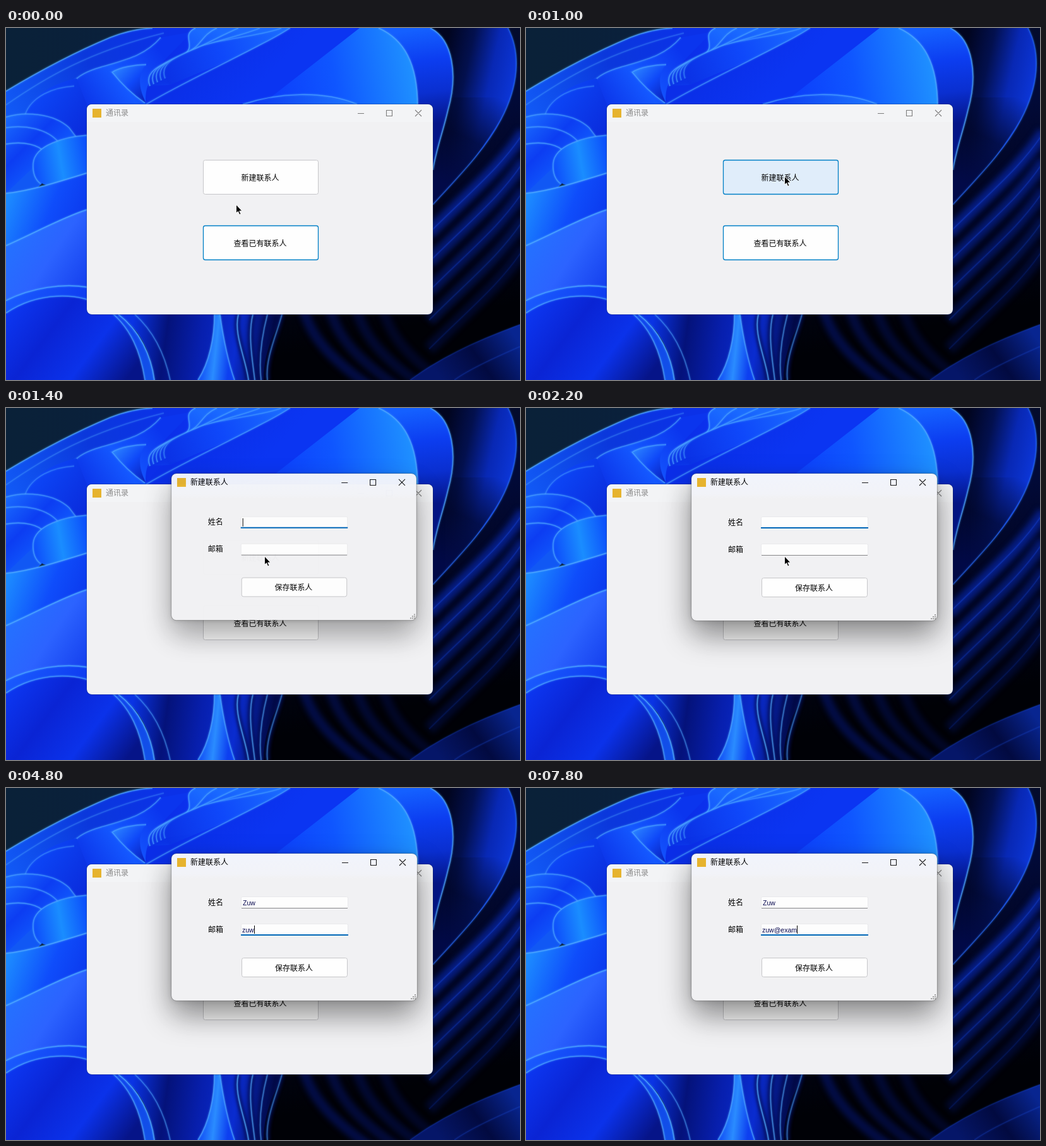
Write an HTML page with a canvas that moves like this. It is 814x558 px and loops after 8000 ms.

```html
<!DOCTYPE html>
<html lang="zh-CN">
<head>
<meta charset="utf-8">
<title>通讯录</title>
<style>
html, body { margin: 0; width: 100%; height: 100%; overflow: hidden; background: #0826c8; }
canvas, svg { position: absolute; left: 0; top: 0; width: 814px; height: 558px; }
text { font: 12px "Noto Sans CJK SC", "Noto Sans CJK", sans-serif; fill: #000; white-space: pre; }
.typed { font: 10.5px "Liberation Sans", Arial, sans-serif; fill: #0a0a50; }
.mid { text-anchor: middle; }
.btn { fill: #fefefe; stroke: #c6c6c9; }
.glyph { fill: none; stroke: #1a1a1a; stroke-width: 1.1; }
.dim { stroke: #7d7d7d; }
</style>
</head>
<body>
<canvas id="wall" width="814" height="558"></canvas>
<svg viewBox="0 0 814 558">
  <defs>
    <linearGradient id="bar" x1="0" y1="0" x2="0" y2="1">
      <stop offset="0" stop-color="#f1f4fc"/><stop offset=".14" stop-color="#f2f3f8"/>
      <stop offset=".17" stop-color="#f1f1f3"/>
    </linearGradient>
    <clipPath id="mainBox"><rect x="128" y="121" width="548" height="333" rx="8"/></clipPath>
  </defs>

  <g clip-path="url(#mainBox)">
    <rect x="128" y="121" width="548" height="333" fill="#f1f1f3"/>
    <rect x="128" y="121" width="548" height="28" fill="#f3f4f6"/>
  </g>
  <rect x="127.5" y="120.5" width="549" height="334" rx="8" fill="none" stroke="#1c2c60" stroke-opacity=".35"/>
  <rect x="137" y="128" width="14" height="14" fill="#e6b32e"/>
  <text x="158" y="139.3" style="fill:#8a8a8a">通讯录</text>
  <path class="glyph dim" d="M557,135.5H567M602.5,130.5H611.5V139.5H602.5ZM648,130L658,140M658,130L648,140"/>
  <rect class="btn" id="add" x="312.5" y="209.5" width="182" height="54" rx="3"/>
  <text class="mid" x="402.5" y="241.5">新建联系人</text>
  <rect class="btn" id="view" x="312.5" y="313.5" width="182" height="54" rx="3"/>
  <text class="mid" x="402.5" y="345.5">查看已有联系人</text>

  <g id="dialog">
    <rect id="panel" x="262" y="104" width="389" height="233" rx="8" fill="url(#bar)"/>
    <rect x="261.7" y="103.7" width="389.6" height="233.6" rx="8" fill="none" stroke="#555" stroke-opacity=".45" stroke-width=".8"/>
    <rect x="271" y="111" width="14" height="14" fill="#e6b32e"/>
    <text x="292" y="122.3">新建联系人</text>
    <path class="glyph" d="M532,118.5H542M577.5,113.5H586.5V122.5H577.5ZM623,113L633,123M633,113L623,123"/>
    <text x="320" y="185.5">姓名</text>
    <text x="320" y="228.5">邮箱</text>
    <g id="fields"></g>
    <rect class="btn" x="373.5" y="269.5" width="167" height="30" rx="3"/>
    <text class="mid" x="456" y="289.5">保存联系人</text>
    <path d="M647,328h2M644,331h2m1,0h2M641,334h2m1,0h2m1,0h2" stroke="#a0a0a0" stroke-width="2"/>
  </g>
  <path id="mouse" d="M0,0V13.5L3,10.7L5.2,15.8L7.4,14.8L5.2,10H9.4Z" stroke="#fff" stroke-width=".9"/>
</svg>
<script>
const $ = id => document.getElementById(id);

// ---- wallpaper ----
const ctx = $('wall').getContext('2d');

function leaf(d, [x0, y0, x1, y1], ...colors) {
  const g = ctx.createLinearGradient(x0, y0, x1, y1);
  colors.forEach((c, i) => g.addColorStop(i / (colors.length - 1), c));
  ctx.fillStyle = g;
  ctx.fill(new Path2D(d));
}

function rim(d, alpha = 0.8, color = '#4fa8ff') {
  const p = new Path2D(d);
  ctx.strokeStyle = color;
  for (const [w, a] of [[6, 0.12], [3.5, 0.25], [1.5, 1]]) {
    ctx.lineWidth = w;
    ctx.globalAlpha = alpha * a;
    ctx.stroke(p);
  }
  ctx.globalAlpha = 1;
}

// a wide, soft fold of cloth in the dark part
function fold(d, width, color) {
  ctx.save();
  ctx.filter = `blur(${width / 4}px)`;
  ctx.strokeStyle = color;
  ctx.lineWidth = width;
  ctx.stroke(new Path2D(d));
  ctx.restore();
}

function paintWall() {
  leaf('M0,0H814V558H0Z', [0, 0, 814, 0], '#0a2138', '#0a1f40', '#030b2c');

  // right side: dark folds under two bright bands
  leaf('M600,100L814,60V558H400V440Z', [720, 130, 790, 440], '#020a38', '#01041c', '#000106');
  leaf('M600,0H795C816,40 812,92 784,145C758,195 712,240 676,280H600Z', [690, 60, 806, 85], '#010520', '#03104e', '#0828b4', '#0c36d8');
  leaf('M690,110L800,110C780,160 720,240 676,280V150Z', [770, 105, 700, 250], 'rgba(1,6,40,0)', 'rgba(1,6,40,.75)', '#020a48');
  rim('M795,0C816,40 812,92 784,145C758,195 712,240 676,280', 0.55, '#2f78ff');
  for (let i = 0; i < 5; i++) {
    const y = 165 + i * 46;
    const d = `M820,${y}C785,${y + 55} 735,${y + 95} 670,${y + 160}`;
    fold(d, 20, `rgba(9,44,190,${0.6 - i * 0.1})`);
    rim(d, 0.4 - i * 0.06, '#1745d8');
  }
  leaf('M560,0H672C708,18 716,75 700,130C692,165 682,190 676,225H600Z', [672, 0, 692, 150], '#1460ff', '#0c3df0', '#0a2fd0', '#041587');
  rim('M672,0C708,18 716,75 700,130C692,165 682,190 676,225', 0.75);

  // upper left petals
  leaf('M0,100C50,70 110,38 165,15C190,5 212,1 232,0H480L222,125L128,180L0,300Z', [0, 110, 260, 0], '#1158f4', '#0b38dc', '#0b31e8');
  rim('M0,100C50,70 110,38 165,15C190,5 212,1 232,0', 0.75);
  rim('M0,122C60,80 130,38 250,8', 0.3);
  leaf('M112,125C88,95 108,74 150,62C190,50 220,44 245,15L330,0L222,125Z', [110, 120, 240, 30], '#0a2fe6', '#1458ff', '#0b35ee');
  rim('M112,122C88,95 108,74 150,62C190,50 220,44 245,15', 0.6);
  leaf('M168,70C180,62 205,58 222,58C206,75 212,100 222,119C200,105 180,85 168,70Z', [170, 65, 222, 115], '#2b83ff', '#0f48f8', '#0820b8');
  rim('M220,119C200,105 180,85 168,70C180,62 205,58 222,58', 0.65);

  // centre petal and its nested folds
  leaf('M222,121C215,75 260,45 300,0H590C630,18 652,55 652,125H222Z', [260, 90, 640, 20], '#0b2ee8', '#0b38fa', '#0f56ff', '#1f92ff');
  for (let i = 0; i < 5; i++) {
    const x = 222 + i * 6, y = 92 - i * 3, end = 300 + i * 34;
    const d = `M${x + 6},${y}C${x - 4},${y - 24} ${x + 24},${y - 34} ${x + 56},${y - 48}C${x + 84},${y - 62} ${end - 26},12 ${end},0`;
    leaf(d + 'h40L260,90Z', [x, y, end, 0], '#0a30e4', '#0f48fa', '#1a6aff');
    rim(d, 0.72 - i * 0.06);
  }
  leaf('M222,121C270,92 335,62 400,28C420,18 438,8 450,0H560L400,125Z', [300, 60, 370, 125], '#0a2fe8', '#0b35f2');
  rim('M222,121C270,92 335,62 400,28C420,18 438,8 450,0', 0.6);
  rim('M590,0C630,18 652,55 652,125', 0.8);
  leaf('M375,125C430,103 500,98 560,125Z', [380, 110, 550, 110], '#0b36f0', '#1d74ff');
  rim('M375,121C430,103 500,98 556,121', 0.7);

  // left petals
  leaf('M30,138C40,105 80,86 112,80L128,121V180L90,160Z', [40, 100, 128, 160], '#0d49fa', '#0a2cdc');
  rim('M30,138C40,108 75,94 108,92', 0.4);
  leaf('M0,141C30,132 75,135 100,158L112,176L60,205L0,262Z', [0, 140, 80, 220], '#1a6cff', '#0c3df2', '#1160ff');
  rim('M0,141C30,132 75,135 100,158L112,174', 0.6);
  rim('M0,158C30,153 66,160 83,181', 0.6);
  rim('M0,184C30,179 52,186 60,196', 0.7);
  leaf('M128,170C95,172 45,185 43,215C42,240 54,246 66,250L128,240Z', [44, 215, 128, 200], '#0e50fb', '#1a8dff', '#0d52fb');
  rim('M128,170C95,172 45,185 43,215C42,232 48,242 55,247', 0.65);
  leaf('M0,262C40,258 90,242 128,230V454H0Z', [0, 280, 128, 330], '#1c8aff', '#0f4dfb', '#0b35ea');
  rim('M0,262C40,258 90,242 128,230', 0.85);
  leaf('M0,345C45,325 90,300 128,288V430H0Z', [0, 340, 120, 420], '#2472ff', '#2c63ff', '#1540ee');
  rim('M0,345C45,325 90,300 128,288', 0.85);

  // lower left bowl
  leaf('M0,432C40,412 90,404 128,410L180,454C218,485 230,525 235,558H0Z', [0, 420, 220, 558], '#1a5cff', '#0d37ee', '#1250e8');
  rim('M0,432C40,412 90,404 130,411', 0.85);
  leaf('M0,452C50,418 115,418 155,442C200,472 214,520 220,558H0Z', [20, 430, 190, 558], '#0c36f0', '#0a24d4', '#0b32ea', '#061488');
  rim('M0,452C50,418 115,418 155,442C200,472 214,520 220,558', 0.7);

  // lower middle: dark valley, bright tent, then ribs
  leaf('M178,454H440C420,485 408,525 408,558H235C230,520 218,482 178,454Z', [200, 470, 420, 500], '#0a34e4', '#04127a', '#071fae', '#0a2cd0', '#020a48');
  rim('M178,454C212,480 230,520 235,558', 0.85);
  rim('M204,454C235,482 252,520 260,558', 0.5);
  leaf('M330,454H339C344,490 352,530 362,558H304C322,530 330,490 330,454Z', [310, 500, 356, 505], '#0f48f4', '#2a8cff', '#0d3ff0');
  rim('M330,454C330,490 322,530 304,558', 0.7);
  rim('M339,454C344,490 352,530 362,558', 0.7);
  for (let i = 0; i < 4; i++) {
    const x = 368 + i * 23, end = 384 + i * 10;
    const d = `M${x},454C${x - 8},485 ${end - 4},525 ${end},558`;
    fold(d, 9, 'rgba(3,10,80,.7)');
    rim(d, 0.75 - i * 0.09);
  }

  // lower right: deep folds fading to black
  for (let i = 0; i < 4; i++) {
    const x = 470 + i * 42;
    fold(`M${x},440C${x + 10},490 ${x + 50},530 ${x + 110},570`, 16, `rgba(5,24,130,${0.5 - i * 0.08})`);
  }
  leaf('M814,470C760,490 690,520 640,558H814Z', [800, 480, 690, 558], '#082590', '#020a40', '#051668');
  rim('M814,470C760,490 690,520 640,558', 0.25, '#1d50e0');
  rim('M814,505C780,520 735,540 710,558', 0.25, '#1d50e0');
}

// ---- input fields ----
function makeField(y, left) {
  const box = document.createElementNS('http://www.w3.org/2000/svg', 'g');
  box.innerHTML = `<rect x="372.5" y="${y + 0.5}" width="169" height="18" rx="2" fill="#fdfdfd" stroke="#e9e9eb"/>
    <rect/><text class="typed" x="${left}" y="${y + 13.5}"></text>
    <rect y="${y + 3}" width="1" height="13"/>`;
  $('fields').append(box);
  const [, line, text, caret] = box.children;
  return (value, focused, caretOn) => {
    const look = focused
      ? { x: 372, y: y + 17, width: 170, height: 2, fill: '#0067b8' }
      : { x: 373, y: y + 18, width: 168, height: 1, fill: '#868689' };
    for (const k in look) line.setAttribute(k, look[k]);
    text.textContent = value;
    const end = value ? text.getComputedTextLength() : 0;
    caret.setAttribute('x', Math.round(left + end));
    caret.style.display = focused && caretOn ? '' : 'none';
  };
}

// ---- timeline: each step changes part of the state ----
const LOOP = 8000;
const steps = [
  [0, { mouse: [364, 280], add: 'idle', viewFocus: true, open: 0, name: '', mail: '', focus: 0, caret: true }],
  [200, { mouse: [366, 277] }],
  [400, { mouse: [377, 266] }],
  [600, { mouse: [393, 249], add: 'hover' }],
  [800, { mouse: [406, 237] }],
  [1000, { mouse: [409, 235] }],
  [1200, { add: 'down' }],
  [1400, { open: 1, viewFocus: false, add: 'idle' }],
  [1600, { open: 2 }],
  [2000, { caret: false }],
  [2400, { mouse: null, name: 'Z', caret: true }],
  [2600, { name: 'Zu' }],
  [2800, { name: 'Zuw' }],
  [3400, { caret: false }],
  [3800, { focus: 1, caret: true }],
  [4400, { mail: 'z' }],
  [4600, { mail: 'zu' }],
  [4800, { mail: 'zuw' }],
  [5200, { caret: false }],
  [5600, { mail: 'zuw@', caret: true }],
  [6200, { caret: false }],
  [6400, { mail: 'zuw@e', caret: true }],
  [6800, { mail: 'zuw@es' }],
  [7200, { mail: 'zuw@e' }],
  [7400, { caret: false }],
  [7800, { mail: 'zuw@exam', caret: true }]
];
const stateAt = t => Object.assign({}, ...steps.filter(s => s[0] <= t).map(s => s[1]));

const IDLE = '#c6c6c9', ACTIVE = '#007fc6';
const addLook = { idle: ['#fefefe', IDLE], hover: ['#e0edfa', ACTIVE], down: ['#cce4f7', '#005499'] };
const setName = makeField(172, 375);
const setMail = makeField(215, 374);

function paintButton(id, fill, stroke) {
  Object.assign($(id).style, { fill, stroke, strokeWidth: stroke === IDLE ? 1 : 1.3 });
}

function render(t) {
  const s = stateAt(t);
  paintButton('add', ...addLook[s.add]);
  paintButton('view', '#fefefe', s.viewFocus ? ACTIVE : IDLE);

  const full = s.open === 2;
  $('dialog').style.display = s.open ? '' : 'none';
  $('dialog').style.opacity = full ? 1 : 0.98;
  $('dialog').setAttribute('transform', full ? '' : 'translate(262 104) scale(.9972) translate(-262 -104)');
  $('panel').style.filter = `drop-shadow(0 22px 24px rgba(0,0,0,${full ? 0.4 : 0.32})) drop-shadow(0 1px 4px rgba(0,0,0,.2))`;
  setName(s.name, s.focus === 0, s.caret);
  setMail(s.mail, s.focus === 1, s.caret);

  $('mouse').style.display = s.mouse ? '' : 'none';
  if (s.mouse) $('mouse').setAttribute('transform', `translate(${s.mouse[0] + 0.5} ${s.mouse[1]})`);
}

paintWall();
const start = performance.now();
let shown = -1;
function tick() {
  const t = Math.floor(((performance.now() - start) % LOOP) / 200) * 200;
  if (t !== shown) render(shown = t);
  requestAnimationFrame(tick);
}
tick();
</script>
</body>
</html>
```
